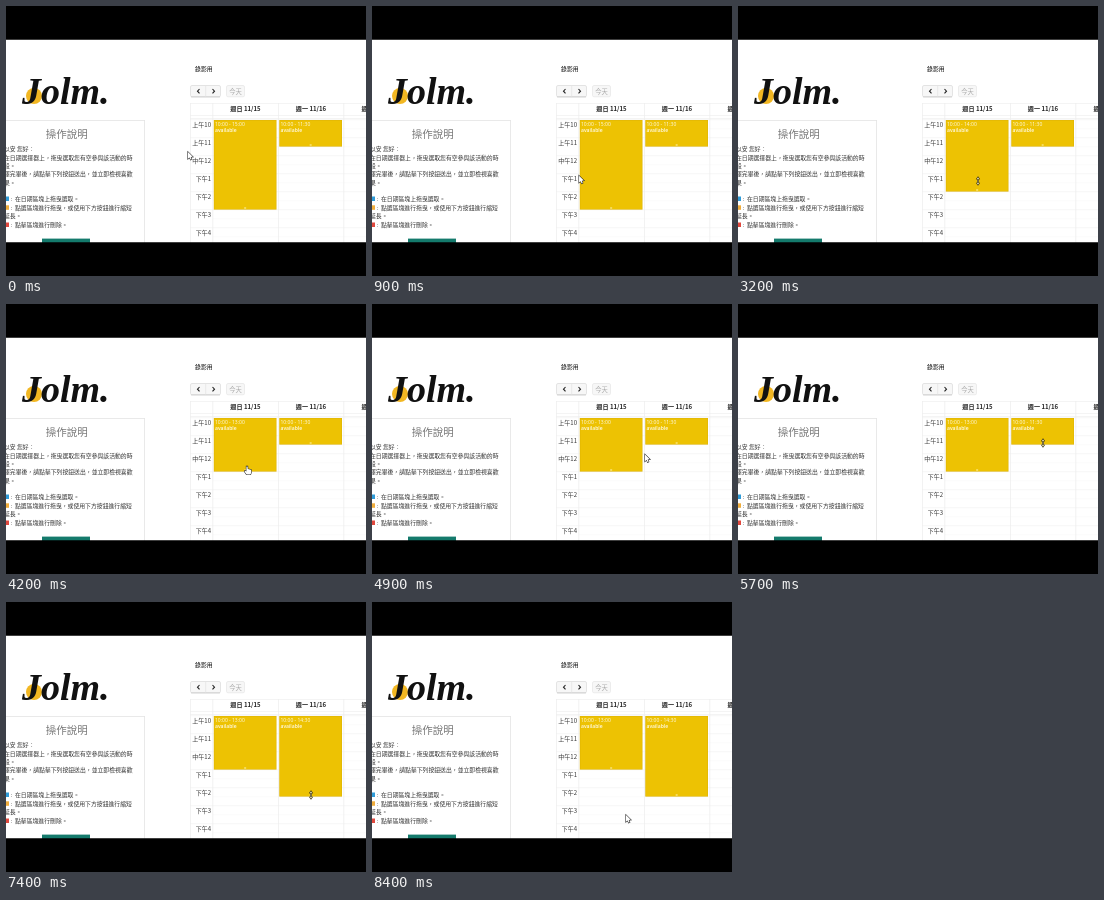
Animation of 360x270 px, one loop 8.5 s. Source, as an HTML page with a canvas:

```html
<!DOCTYPE html>
<html lang="zh-Hant">
<head>
<meta charset="utf-8">
<title>操作說明</title>
<style>
  html, body { margin: 0; width: 100%; height: 100%; overflow: hidden; background: #fff; }
  canvas { display: block; width: 360px; height: 270px; }
</style>
</head>
<body>
<canvas id="stage"></canvas>
<script>
const W = 360, H = 270, LOOP = 8500, STEP = 100;
const BAR = (H - W * 9 / 16) / 2;
const GRID_TOP = 114, SLOT = 9; // one slot is half an hour
const EVENT_W = 62.7;
const CJK = '"Noto Sans CJK TC", "Noto Sans CJK", sans-serif';
const LATIN = '"Open Sans", "Noto Sans", sans-serif';

const canvas = document.getElementById('stage');
const ctx = canvas.getContext('2d');
const ratio = window.devicePixelRatio || 1;
canvas.width = W * ratio;
canvas.height = H * ratio;

// Pointer route: time, x, y
const route = [
  [0, 182, 146], [400, 182, 146], [1500, 240, 201], [2200, 240, 201],
  [3200, 240, 175], [3700, 240, 165], [3900, 240, 165], [4100, 241, 162],
  [4500, 241, 162], [5300, 305, 139], [5900, 305, 139], [6700, 305, 174],
  [7200, 305, 193], [7500, 305, 193], [8200, 254, 213], [LOOP, 254, 213]
];

const events = [
  { x: 207.8, slots: 10, from: 2200, to: 3900, grab: 201 },
  { x: 273.3, slots: 3, from: 5900, to: 7500, grab: 139 }
];

function pointerAt(t) {
  let i = 0;
  while (i < route.length - 2 && t >= route[i + 1][0]) i++;
  const [t0, x0, y0] = route[i], [t1, x1, y1] = route[i + 1];
  const p = Math.min(1, (t - t0) / (t1 - t0));
  const k = x0 === x1 ? p : p * p * (3 - 2 * p);
  return { x: x0 + (x1 - x0) * k, y: y0 + (y1 - y0) * k };
}

// The block trails the highlighted slot by less than one step while dragged.
function eventState(ev, t) {
  const moved = (pointerAt(Math.min(Math.max(t, ev.from), ev.to)).y - ev.grab) / SLOT;
  const dragging = t >= ev.from && t < ev.to;
  const target = ev.slots + Math.round(moved);
  return {
    x: ev.x, dragging, target,
    slots: dragging ? ev.slots + Math.trunc(moved) : target
  };
}

const slotY = n => GRID_TOP + n * SLOT;

function rect(x, y, w, h, color) {
  ctx.fillStyle = color;
  ctx.fillRect(x, y, w, h);
}

function text(str, x, y, size, color, { font = CJK, style = '', align = 'left' } = {}) {
  ctx.font = `${style} ${size}px ${font}`;
  ctx.textAlign = align;
  ctx.fillStyle = color;
  ctx.fillText(str, x, y);
}

function shape(points, fill, stroke, width) {
  ctx.beginPath();
  points.forEach(([x, y]) => ctx.lineTo(x, y));
  ctx.closePath();
  ctx.lineWidth = width;
  ctx.strokeStyle = stroke;
  ctx.stroke();
  ctx.fillStyle = fill;
  ctx.fill();
}

function drawBrand() {
  ctx.fillStyle = '#f2b722';
  ctx.beginPath();
  ctx.arc(28, 90, 8, 0, Math.PI * 2);
  ctx.fill();
  text('Jolm.', 16, 98, 38, '#111', { font: '"Liberation Serif", serif', style: 'italic bold' });
}

function drawGuide() {
  rect(0, 114, 139, 0.8, '#e4e4e4');
  rect(138, 114, 0.8, 123, '#e4e4e4');
  text('操作說明', 60.7, 132, 10.5, '#777', { align: 'center' });
  const lines = [
    ['以安 您好：', -2, 144.5],
    ['在日期選擇器上，拖曳選取您有空參與該活動的時', -2, 153.5],
    ['段。', -2, 161.5],
    ['擇完畢後，請點擊下列按鈕送出，並立即檢視喜歡', -2, 170.3],
    ['果。', -2, 178.5],
    ['在日期區塊上拖曳選取。', 9, 195],
    ['點選區塊進行拖曳，或使用下方按鈕進行縮短', 9, 203.8],
    ['延長。', -2, 212],
    ['點擊區塊進行刪除。', 9, 221]
  ];
  lines.forEach(([str, x, y]) => text(str, x, y, 5.85, '#333'));
  [['#2f9bd8', 195], ['#f0ad3c', 203.8], ['#e0483e', 221]].forEach(([color, y]) => {
    rect(0, y - 4.5, 3, 4.5, color);
    text(':', 4.6, y - 0.3, 6, '#333');
  });
  rect(36, 232.6, 48, 5, '#147a6c');
}

function button(x, w, border) {
  ctx.beginPath();
  ctx.roundRect(x + 0.5, 79.5, w - 1, 11.3, 1.5);
  ctx.fillStyle = '#f7f7f7';
  ctx.fill();
  ctx.lineWidth = 0.7;
  ctx.strokeStyle = border;
  ctx.stroke();
}

function chevron(x, dir) {
  ctx.beginPath();
  ctx.moveTo(x - dir, 83);
  ctx.lineTo(x + dir, 85.2);
  ctx.lineTo(x - dir, 87.4);
  ctx.lineWidth = 1.1;
  ctx.strokeStyle = '#222';
  ctx.stroke();
}

function drawCalendar() {
  text('錄影用', 189, 65.2, 5.9, '#000', { style: '500' });
  button(184, 31, '#dadada');
  rect(185, 90.6, 29, 0.7, '#c4c4c4');
  rect(199.5, 80, 0.6, 11, '#e0e0e0');
  chevron(192.5, -1);
  chevron(207.5, 1);
  button(220, 19, '#e6e6e6');
  text('今天', 229.5, 87.5, 6.3, '#aaa', { align: 'center' });

  [97, 109, 112].forEach(y => rect(184, y, 176, 0.7, '#f0f0f0'));
  for (let i = 0; i < 14; i++) {
    const major = i % 2 === 0;
    rect(major ? 184 : 207, slotY(i) - 0.5, 176, 0.7, major ? '#f2f2f2' : '#fafafa');
  }
  [184, 206.5, 272, 337.5].forEach(x => rect(x, 97, 0.7, 140, '#ececec'));

  const bold = { style: 'bold', align: 'center' };
  text('週日 11/15', 239.5, 105, 6.1, '#222', bold);
  text('週一 11/16', 305, 105, 6.1, '#222', bold);
  text('週二 11/17', 355.5, 105, 6.1, '#222', { style: 'bold' });
  ['上午10', '上午11', '中午12', '下午1', '下午2', '下午3', '下午4'].forEach((label, i) =>
    text(label, 205, 121 + i * 18, 6, '#333', { align: 'right' }));
}

function clock(slots) {
  return `${10 + Math.floor(slots / 2)}:${slots % 2 ? '30' : '00'}`;
}

function drawEvent(ev) {
  const height = ev.slots * SLOT - 0.4;
  if (ev.dragging && ev.target > ev.slots) {
    rect(ev.x - 1, slotY(ev.slots), EVENT_W + 1.5, (ev.target - ev.slots) * SLOT, '#fdf8c8');
  }
  rect(ev.x, GRID_TOP, EVENT_W, height, '#deb405');
  rect(ev.x + 0.6, GRID_TOP + 0.6, EVENT_W - 1.2, height - 1.2, '#edc203');
  text(`10:00 - ${clock(ev.slots)}`, ev.x + 1.2, 120, 5, '#fffbe8', { font: LATIN });
  text('available', ev.x + 1.2, 125.7, 5, '#fffbe8', { font: LATIN, style: '600' });
  const mid = ev.x + EVENT_W / 2;
  rect(mid - 1, GRID_TOP + height - 2.2, 2, 0.5, '#fff3b0');
  rect(mid - 1, GRID_TOP + height - 1.2, 2, 0.5, '#fff3b0');
}

const cursors = {
  arrow() {
    shape([[0, 0], [0, 6.8], [1.6, 5.4], [2.6, 7.8], [3.7, 7.3], [2.7, 5], [4.8, 4.8]],
      '#fff', '#222', 1.1);
  },
  resize() {
    const half = [[0, -3.8], [1.2, -2.2], [0.3, -2]];
    const right = half.concat(half.slice().reverse().map(([x, y]) => [x, -y]));
    const left = right.slice(1, -1).reverse().map(([x, y]) => [-x, y]);
    shape(right.concat(left), '#e8dfb8', '#2a2406', 1.1);
  },
  hand() {
    shape([[-0.6, 0.4], [0.6, 0.4], [0.8, 3], [4, 3.7], [4.4, 6], [3.5, 8.5],
      [-0.4, 8.5], [-2.5, 5.4], [-2, 4.6], [-0.6, 5.6]], '#fff', '#222', 1.1);
  }
};

function cursorKind(p, states) {
  if (states.some(s => s.dragging)) return 'resize';
  const over = states.find(s => p.x >= s.x && p.x <= s.x + EVENT_W &&
    p.y >= GRID_TOP && p.y <= slotY(s.slots));
  if (!over) return 'arrow';
  return slotY(over.slots) - p.y < 4 ? 'resize' : 'hand';
}

function draw(t) {
  ctx.setTransform(ratio, 0, 0, ratio, 0, 0);
  rect(0, 0, W, H, '#fff');
  drawBrand();
  drawGuide();
  drawCalendar();

  const states = events.map(ev => eventState(ev, t));
  states.forEach(drawEvent);

  const p = pointerAt(t);
  ctx.save();
  ctx.translate(p.x, p.y);
  cursors[cursorKind(p, states)]();
  ctx.restore();

  rect(0, 0, W, BAR, '#000');
  rect(0, H - BAR, W, BAR, '#000');
}

const start = performance.now();
function tick() {
  const t = (performance.now() - start) % LOOP;
  draw(Math.floor(t / STEP) * STEP);
  requestAnimationFrame(tick);
}
tick();
</script>
</body>
</html>
```
